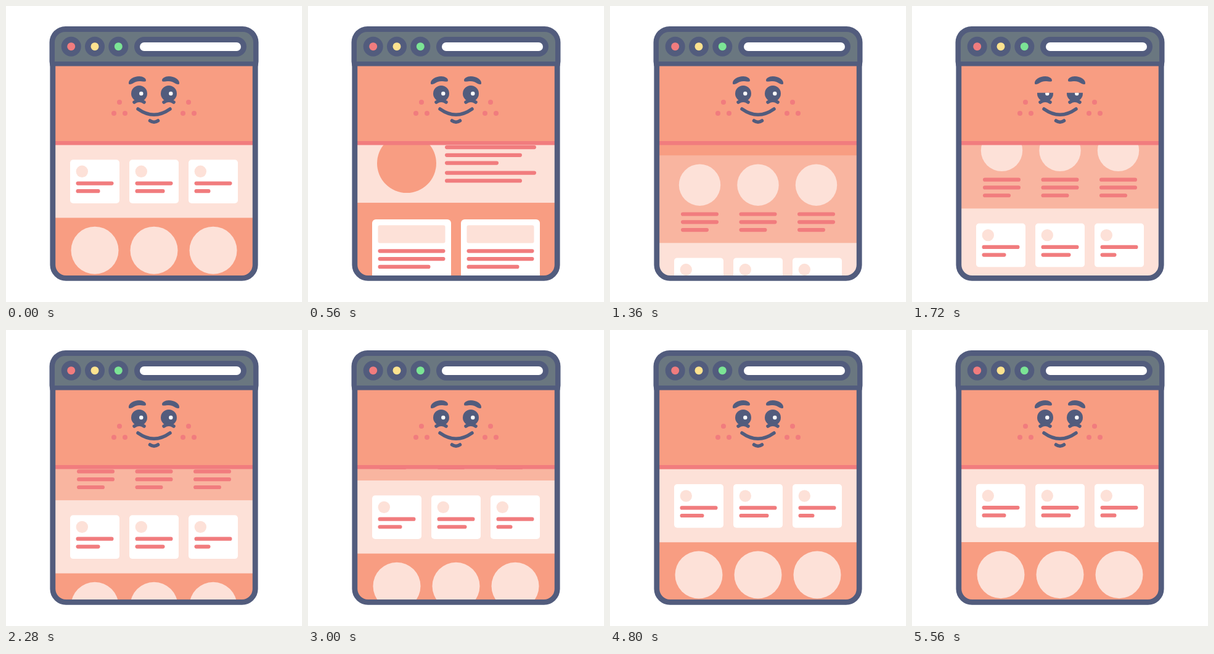
Recreate the animation shown at these times as an HTML page. Size 480 by 480 pixels, loop 6000 ms.

```html
<!DOCTYPE html>
<html lang="en">
<head>
<meta charset="utf-8">
<title>Scrolling browser</title>
<style>
html, body { margin: 0; width: 100%; height: 100%; overflow: hidden; background: #fff; }
svg { display: block; width: 100%; height: 100%; }
</style>
</head>
<body>
<svg viewBox="0 0 480 480">
  <defs>
    <clipPath id="view"><path d="M76 220H404V424A18 18 0 0 1 386 441H94A18 18 0 0 1 76 424Z"/></clipPath>
    <clipPath id="open"><rect id="lid" x="190" y="120" width="100" height="45"/></clipPath>
    <g id="brow"><path d="M199 126C198 119 207 114 216 114C222 114 227 117 227 120.500C227 124 222 122 216 122C209 122 205 127 201 127Q199 127 199 126Z"/></g>
    <g id="lash"><path d="M208 156Q216 150.500 224 156"/></g>
    <g id="dots"><circle cx="184" cy="156" r="4"/><circle cx="175" cy="174" r="4"/><circle cx="193" cy="174" r="4"/></g>
  </defs>

  <path d="M76 95H404V424A18 18 0 0 1 386 441H94A18 18 0 0 1 76 424Z" fill="#f89d82"/>
  <g clip-path="url(#view)"><g id="page"></g></g>

  <rect x="76" y="94" width="328" height="126" fill="#f89d82"/>
  <rect x="76" y="219" width="328" height="6.500" fill="#f17c7e"/>

  <g fill="#f17c7e">
    <use href="#dots"/>
    <use href="#dots" transform="matrix(-1 0 0 1 480 0)"/>
  </g>
  <g clip-path="url(#open)">
    <g fill="#525c7d"><circle cx="216" cy="142" r="13"/><circle cx="264" cy="142" r="13"/></g>
    <g fill="#fff"><circle cx="219.300" cy="142" r="3.200"/><circle cx="267.300" cy="142" r="3.200"/></g>
  </g>
  <g fill="#525c7d">
    <use href="#brow"/>
    <use href="#brow" transform="matrix(-1 0 0 1 480 0)"/>
  </g>
  <g fill="none" stroke="#525c7d" stroke-width="5.500" stroke-linecap="round">
    <use href="#lash"/>
    <use href="#lash" transform="translate(48 0)"/>
    <path d="M214 167Q240 185.500 266 167"/>
    <path d="M233.500 186Q240 190.500 246.500 186"/>
  </g>

  <path d="M75.800 92V420A21.500 21.500 0 0 0 97.300 441.300H382.700A21.500 21.500 0 0 0 404.200 420V92" fill="none" stroke="#525c7d" stroke-width="8.800"/>
  <path d="M70.500 90V59A26 26 0 0 1 96.500 33H383.500A26 26 0 0 1 409.500 59V90L408.500 97.500H71.500Z" fill="#525c7d"/>
  <path d="M79 90V59A17 17 0 0 1 96 42H384A17 17 0 0 1 401 59V90Z" fill="#6a7780"/>
  <g fill="#525c7d">
    <circle cx="105.700" cy="65.700" r="16"/><circle cx="144" cy="65.700" r="16"/><circle cx="182.300" cy="65.700" r="16"/>
    <rect x="208" y="50" width="182" height="32" rx="16"/>
  </g>
  <circle cx="105.700" cy="65.700" r="6.500" fill="#f17c7e"/>
  <circle cx="144" cy="65.700" r="6.500" fill="#fde28f"/>
  <circle cx="182.300" cy="65.700" r="6.500" fill="#7be495"/>
  <rect x="217" y="59" width="164" height="14" rx="7" fill="#fff"/>
</svg>
<script>
const LOOP = 6000, SCROLL = 5600, REST = -194.5;
const CORAL = '#f89d82', PEACH = '#f9b5a0', CREAM = '#fde1d8', ROSE = '#f17c7e', WHITE = '#fff';

const rect = (x, y, w, h, r, fill) =>
  `<rect x="${x}" y="${y}" width="${w}" height="${h}" rx="${r}" fill="${fill}"/>`;
const disc = (x, y, r, fill) => `<circle cx="${x}" cy="${y}" r="${r}" fill="${fill}"/>`;
const line = (x, y, w) => rect(x, y - 3.1, w, 6.2, 3.1, ROSE);
const each = (items, draw) => items.map(draw).join('');

const sections = [
  { h: 128, fill: CREAM, body: disc(160, 64, 48, CORAL) +
    each([[38, 148], [50.7, 125], [63.5, 87], [79.5, 148], [92.3, 125]], ([y, w]) => line(222, y, w)) },
  { h: 150, fill: CORAL, body: each([104, 248], x =>
    rect(x, 27, 128, 96, 6, WHITE) + rect(x + 9.5, 36.5, 109, 29, 3, CREAM) +
    each([109, 109, 85], (w, i) => line(x + 9.5, 78.2 + i * 12.8, w))) },
  { h: 142, fill: PEACH, body: each([145.5, 240, 334.5], x =>
    disc(x, 48, 33.7, CREAM) +
    each([61, 61, 45], (w, i) => line(x - 30.5, 95.3 + i * 12.8, w))) },
  { h: 118.5, fill: CREAM, body: each([39, 48, 26], (w, i) => {
    const x = 104 + i * 96;
    return rect(x, 24.2, 80, 70.8, 5, WHITE) + disc(x + 19.3, 43.3, 9.7, CREAM) +
      line(x + 9.5, 62.6, 61) + line(x + 9.5, 75.2, w);
  }) },
  { h: 106, fill: CORAL, body: each([144, 240, 336], x => disc(x, 52.7, 38.5, CREAM)) }
];

let height = 0;
const stack = each(sections, s => {
  const g = `<g transform="translate(0 ${height})">${rect(76, 0, 328, s.h + 0.5, 0, s.fill)}${s.body}</g>`;
  height += s.h;
  return g;
});
const page = document.getElementById('page');
const lid = document.getElementById('lid');
page.innerHTML = `<g transform="translate(0 ${-height})">${stack}</g><g>${stack}</g>`;

// Distance left, as a fraction, on cubic-bezier(.22, 1, .36, 1).
function left(x) {
  let lo = 0, hi = 1;
  for (let i = 0; i < 30; i++) {
    const s = (lo + hi) / 2, w = 1 - s;
    if (0.66 * s * w * w + 1.08 * s * s * w + s * s * s < x) lo = s; else hi = s;
  }
  return (1 - lo) ** 3;
}

function draw(t) {
  const rest = t < SCROLL ? left(t / SCROLL) : 0;
  page.setAttribute('transform', `translate(0 ${(REST + height * rest).toFixed(2)})`);
  const blink = t > 1680 && t < 1920 ? Math.sin(Math.PI * (t - 1680) / 240) : 0;
  const top = 128.5 + 24 * blink;
  lid.setAttribute('y', top);
  lid.setAttribute('height', 165 - top);
}

const start = performance.now();
function tick() {
  draw((performance.now() - start) % LOOP);
  requestAnimationFrame(tick);
}
draw(0);
requestAnimationFrame(tick);
</script>
</body>
</html>
```
